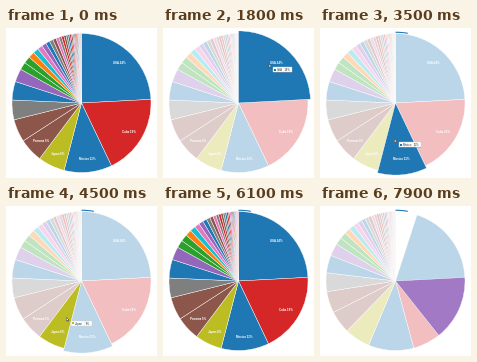
Recreate the animation shown at these times as a matplotlib script. Size 151x150 px, loop 8000 ms.

```python
import numpy as np
import matplotlib.pyplot as plt
from matplotlib.animation import FuncAnimation
from matplotlib.colors import to_rgb
from matplotlib.patches import Polygon, Rectangle, Wedge

W, H, DPI = 151, 150, 100
STEP, FRAMES = 100, 80
CX, CY, R, GROW = 75.5, 75, 69.5, 2.6
DIM = 0.3

PALETTE = ["#1f77b4", "#ff7f0e", "#2ca02c", "#d62728", "#9467bd",
           "#8c564b", "#e377c2", "#7f7f7f", "#bcbd22", "#17becf"]
LABELS = [("USA", "24%"), ("Cuba", "19%"), ("Mexico", "11%"),
          ("Japan", "6%"), ("Panama", "5%")]

# slice edges in degrees, clockwise from the top; the tail shrinks geometrically
HEAD = [0, 87, 154.5, 194.5, 217, 237, 256, 272.5, 288, 299]
TAIL = 0.9 ** np.arange(28)
EDGES = np.concatenate([HEAD, 299 + 61 * np.cumsum(TAIL) / TAIL.sum()])
HUES = [PALETTE[int(c)] for c in "030855704" + "2219640756735703567530756753"]

# (start ms, hovered slice, fade ms)
HOVERS = [(-1000, None, 100), (1000, 0, 400), (2100, 1, 200),
          (3300, 2, 200), (4500, 3, 100), (5800, None, 400)]

# cursor stops: ms, x, y
PATH = [(1000, 128, 22), (1300, 107, 37), (1800, 107, 37), (2300, 115, 88.5),
        (3100, 115, 88.5), (3500, 75.5, 112), (4200, 75.5, 112), (4500, 61.5, 112.5),
        (5800, 61.5, 112.5)]

RELOAD = 7800


def mix(color, level):
    return tuple(1 - level * (1 - c) for c in to_rgb(color))


def ease(p):
    p = min(max(p, 0), 1)
    return p * p * (3 - 2 * p)


def px(size):
    return size * 72 / DPI


def hover_state(t):
    """Previous slice, hovered slice, ms since the switch, fade time."""
    k = max(i for i, h in enumerate(HOVERS) if h[0] <= t)
    start, now, fade = HOVERS[k]
    return HOVERS[max(k - 1, 0)][1], now, t - start + STEP, fade


def opacity(i, hovered):
    return 1 if hovered is None or hovered == i else DIM


def cursor_at(t):
    for (t0, x0, y0), (t1, x1, y1) in zip(PATH, PATH[1:]):
        if t0 <= t <= t1:
            p = ease((t - t0) / (t1 - t0))
            return x0 + p * (x1 - x0), y0 + p * (y1 - y0)


def wedge(a, b, color, r=R, **kw):
    ax.add_patch(Wedge((CX, CY), r, a - 90, b - 90, fc=color, ec="white",
                       lw=px(0.4), **kw))


def text(x, y, s, size, color, **kw):
    ax.text(x, y, s, fontsize=px(size), color=color, family="Liberation Sans",
            va="center_baseline", **kw)


def top_rim():
    """Sliver left above the first slice after it shrinks back."""
    ax.add_patch(Wedge((CX, CY), R + 1.8, -90, -80, width=1.1, fc=PALETTE[0], lw=0))


def tooltip(x, y, i):
    name, share = LABELS[i]
    left, top = x + 3, y + 2
    width = 15.5 + 1.1 * len(name)
    split = left + width - 6.5
    ax.add_patch(Rectangle((left + 0.6, top + 0.6), width, 5, fc="#777777",
                           alpha=0.35, lw=0, zorder=5))
    ax.add_patch(Rectangle((left, top), width, 5, fc="white", ec="#cccccc",
                           lw=px(0.4), zorder=6))
    ax.add_patch(Rectangle((left + 1.2, top + 1.5), 2, 2, fc=HUES[i], lw=0, zorder=7))
    ax.plot([split, split], [top + 0.8, top + 4.2], color="#bbbbbb", lw=px(0.3), zorder=7)
    text(left + 4, top + 2.6, name, 2.9, "#333333", zorder=7)
    text(left + width - 1, top + 2.6, share, 2.9, "#333333", ha="right", zorder=7)


def pointer(x, y):
    shape = np.array([(0, 0), (0, 3.6), (0.9, 2.8), (1.5, 4.1), (2.1, 3.8),
                      (1.5, 2.6), (2.6, 2.5)])
    ax.add_patch(Polygon(shape + (x - 1, y - 1), fc="white", ec="#444444",
                         lw=px(0.5), zorder=8))


def draw_labels():
    for i, words in enumerate(LABELS):
        mid = np.radians((EDGES[i] + EDGES[i + 1]) / 2)
        text(CX + 0.8 * R * np.sin(mid), CY - 0.8 * R * np.cos(mid), " ".join(words),
             2.9, "white", weight="bold", ha="center", zorder=4)


def draw_pie(t):
    before, now, since, fade = hover_state(t)
    p = min(since / fade, 1)
    for i, hue in enumerate(HUES):
        level = opacity(i, before) * (1 - p) + opacity(i, now) * p
        r = R
        if i == now:
            r += GROW * ease((since - STEP) / 150)
        elif i == before:
            r += GROW * (1 - ease((since - STEP) / 200))
        wedge(EDGES[i], EDGES[i + 1], mix(hue, level), r, zorder=3 if i == now else 2)
    draw_labels()
    spot = cursor_at(t)
    if spot and now is not None:
        tooltip(*spot, now)
        pointer(*spot)


def draw_reload(t):
    """A new slice sweeps in while the others make room at the top."""
    p = (t - RELOAD + STEP) / (2 * STEP)
    gap = 18 * p ** 1.6
    level = 0.5 if p < 1 else DIM
    edges = gap + EDGES * (1 - gap / 360)
    for a, b, hue in zip(edges, edges[1:], HUES):
        wedge(a, b, mix(hue, level))
    start = 340 + (87 - 340) * p
    wedge(start, start + 5 + 49.5 * p, mix(PALETTE[4], 0.88))


def draw(n):
    t = n * STEP
    ax.clear()
    ax.set(xlim=(0, W), ylim=(H, 0))
    ax.axis("off")
    if t >= HOVERS[2][0]:
        top_rim()
    if t < RELOAD:
        draw_pie(t)
    else:
        draw_reload(t)
    return []


fig = plt.figure(figsize=(W / DPI, H / DPI), dpi=DPI, facecolor="white")
ax = fig.add_axes([0, 0, 1, 1])
anim = FuncAnimation(fig, draw, frames=FRAMES, interval=STEP, init_func=lambda: [],
                     repeat=True, repeat_delay=0)
plt.show()
```
